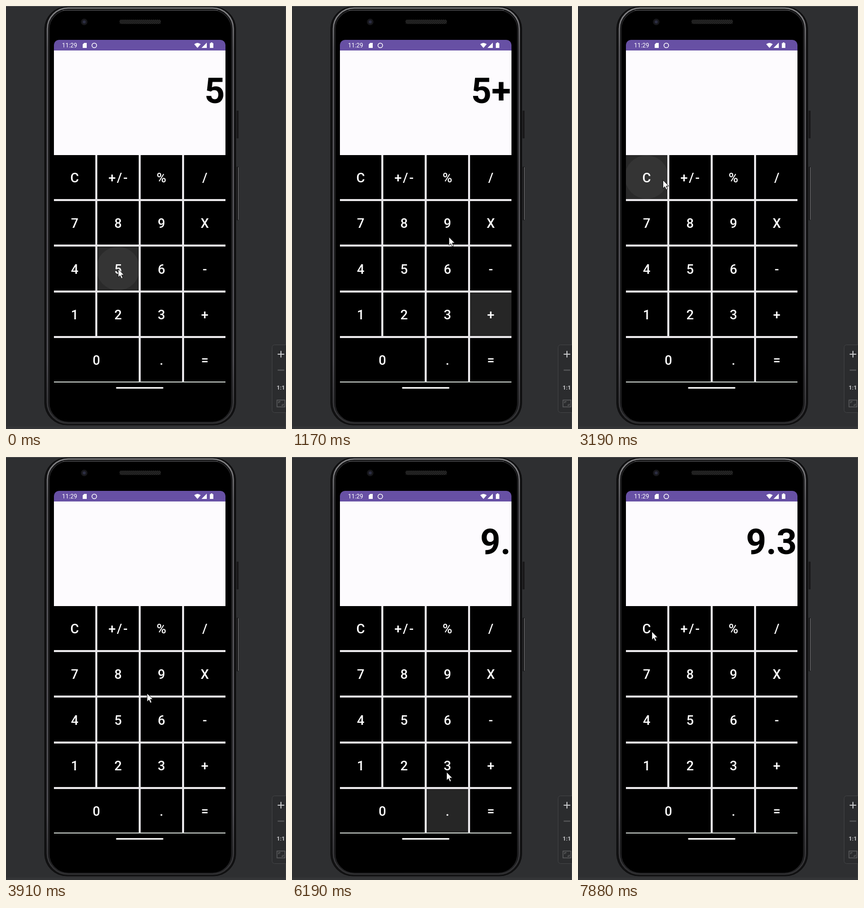
An HTML page that plays this animation: 555x837 px, repeating every 8000 ms.

```html
<!DOCTYPE html>
<html lang="en">
<head>
<meta charset="utf-8">
<title>Calculator</title>
<style>
html, body { margin: 0; width: 100%; height: 100%; overflow: hidden; background: #2e2f31; }
svg { display: block; }
text { font-family: Roboto, sans-serif; }
.label { font-size: 26px; font-weight: 500; letter-spacing: 2.3px; fill: #fff; text-anchor: middle; }
</style>
</head>
<body>
<svg width="555" height="837" viewBox="0 0 555 837">
  <defs>
    <linearGradient id="rim" x1="0" y1="0" x2="0" y2="1">
      <stop offset="0" stop-color="#858587"/>
      <stop offset=".1" stop-color="#605f64"/>
      <stop offset=".85" stop-color="#55545a"/>
      <stop offset="1" stop-color="#303032"/>
    </linearGradient>
    <pattern id="mesh" width="4" height="4" patternUnits="userSpaceOnUse">
      <rect width="4" height="4" fill="#131313"/>
      <path d="M0 4L4 0M0 0L4 4" stroke="#353535" stroke-width=".8"/>
    </pattern>
  </defs>

  <rect width="555" height="837" fill="#2e2f31"/>
  <rect width="555" height="1" fill="#58595b"/>
  <rect y="832" width="555" height="5" fill="#343537"/>
  <rect x="554" width="1" height="837" fill="#444547"/>

  <!-- phone body -->
  <rect x="457" y="207" width="4" height="55" rx="1" fill="#19191a"/>
  <rect x="457" y="318" width="4" height="106" rx="1" fill="#19191a"/>
  <path d="M460.5 319V423" stroke="#757577"/>
  <rect x="76.5" y="1.5" width="379" height="827.5" rx="44" fill="#111112" stroke="#0b0b0c"/>
  <rect x="82" y="4" width="368.5" height="821.5" rx="41" fill="none" stroke="url(#rim)" stroke-width="2.6"/>
  <rect x="85.5" y="8" width="361.5" height="815.5" rx="38" fill="#000" stroke="#252527" stroke-width="1.6"/>
  <path d="M112 8.5H420" stroke="#5b5b5d"/>
  <circle cx="155" cy="31.5" r="6.5" fill="#17171b"/>
  <circle cx="155" cy="31.5" r="3" fill="#2c2e42"/>
  <rect x="225" y="27" width="82" height="8.5" rx="4" fill="url(#mesh)"/>

  <!-- screen -->
  <path d="M95 88V77A10 10 0 0 1 105 67H425A10 10 0 0 1 435 77V88Z" fill="#6750a4"/>
  <text x="111" y="82" font-size="12" fill="#fff">11:29</text>
  <g fill="#fff">
    <path d="M155 73H160V83H152V76Z"/>
    <path d="M373 75.5Q379.5 70.5 386 75.5L379.5 83Z"/>
    <path d="M398 72.5V83H387.5Z"/>
    <path d="M404 73.5H406V72H409V73.5H411V83H404Z"/>
  </g>
  <circle cx="175" cy="78" r="4.6" fill="none" stroke="#fff" stroke-width="1.5"/>
  <rect x="95" y="88" width="340" height="207" fill="#fdfbfe"/>
  <text id="display" x="433.6" y="192.4" font-size="70" font-weight="700" text-anchor="end"></text>

  <!-- keypad -->
  <rect x="95" y="295" width="340" height="449" fill="#e9e7ea"/>
  <rect x="95" y="743" width="340" height="2" fill="#cbd2cd"/>
  <g id="keys"></g>
  <svg id="glow" overflow="hidden">
    <rect id="tint" width="100%" height="100%"/>
    <circle id="ripple" cx="50%" cy="50%" fill="#343434"/>
  </svg>
  <g id="labels"></g>
  <rect x="218" y="754" width="94" height="3.2" rx="1.6" fill="#f0f0f0"/>

  <!-- zoom panel -->
  <rect x="527.5" y="670.5" width="40" height="134" rx="5" fill="#2b2c2e" stroke="#434446"/>
  <path d="M538.5 689H551.5M545 682.5V695.5" stroke="#c4c5c7" stroke-width="2"/>
  <path d="M538.5 720.5H551.5" stroke="#5b5c5e" stroke-width="2"/>
  <text x="536.5" y="758.5" font-size="11.5" font-weight="700" fill="#c4c5c7">1:1</text>
  <g fill="none" stroke="#5b5c5e" stroke-width="1.5">
    <rect x="537.2" y="779.7" width="15.6" height="13.6"/>
    <path d="M540.5 786V783H544M549.5 787V790H546"/>
  </g>

  <path id="cursor" d="M.4 .4V17L4.1 13.4L6.8 19.4L9.5 18.2L6.9 12.2H11.9Z" fill="#fff" stroke="#000" stroke-width=".9"/>
</svg>
<script>
const LOOP = 8000, STEP = 131.5;
const el = id => document.getElementById(id);
const set = (node, attrs) => {
  for (const k in attrs) node.setAttribute(k, attrs[k]);
  return node;
};
const add = (parent, tag, attrs) =>
  parent.appendChild(set(document.createElementNS("http://www.w3.org/2000/svg", tag), attrs));

// Keypad, with edges snapped to whole pixels
const keys = {};
["C +/- % /", "7 8 9 X", "4 5 6 -", "1 2 3 +", "0 0 . ="].forEach((line, row) => {
  line.split(" ").forEach((name, col) => {
    if (name === "0" && col) return;
    const top = 295.4 + 90.4 * row, x = 95 + 86 * col, y = Math.round(top);
    const width = name === "0" ? 168 : 82, height = Math.round(top + 86.4) - y;
    keys[name] = { x, y, width, height };
    add(el("keys"), "rect", keys[name]);
    add(el("labels"), "text", { class: "label", x: x + width / 2 + 1.2, y: Math.floor(top + 53.9) })
      .textContent = name;
  });
});

// Key, touch time, fade time
const presses = [
  ["5", -120, 360], ["+", 780, 1320], ["9", 1840, 2350], ["C", 3070, 3790],
  ["9", 4630, 5410], [".", 5680, 6330], ["3", 6990, 7520]
];
const DELAY = 120, FADE = 120, SETTLE = 150;

// Pointer: leave time, arrival time, x, y
const start = [222, 520];
const moves = [
  [0, 480, 379, 603],
  [780, 1170, 311, 458],
  [1170, 1440, 305, 433],
  [2240, 2470, 168, 344],
  [3680, 3910, 277, 468],
  [3910, 4330, 304, 459],
  [4750, 4860, 284, 652],
  [4870, 5140, 298, 719],
  [5800, 6180, 306, 623],
  [6190, 6450, 306, 606],
  [7120, 7380, 217, 307],
  [7380, 7880, 146, 345]
];

const clamp = v => Math.min(1, Math.max(0, v));

function pointerAt(t) {
  let [x, y] = start;
  for (const [leave, arrive, toX, toY] of moves) {
    const done = clamp((t - leave) / (arrive - leave));
    x += (toX - x) * done;
    y += (toY - y) * done;
  }
  return [x, y];
}

function reading(t) {
  return presses.filter(p => p[1] + DELAY <= t)
    .reduce((shown, [name]) => name === "C" ? "" : shown + name, "");
}

function drawGlow(t) {
  const press = presses.find(p => t >= p[1] && t < p[2] + FADE);
  set(el("glow"), { visibility: press ? "visible" : "hidden" });
  if (!press) return;
  const [name, touch, fade] = press;
  const settled = t >= fade - SETTLE;
  set(el("glow"), keys[name]);
  set(el("tint"), { fill: t >= fade ? "#121212" : settled ? "#262626" : "#2a2a2a" });
  set(el("ripple"), { r: settled ? 0 : 28 + 15 * clamp((t - touch) / DELAY) });
}

function draw(t) {
  const stepped = Math.floor((t + 50) / STEP) * STEP;
  el("display").textContent = reading(t);
  drawGlow(t);
  set(el("cursor"), { transform: `translate(${pointerAt(stepped)})` });
}

const begin = performance.now();
function tick() {
  draw((performance.now() - begin) % LOOP);
  requestAnimationFrame(tick);
}
tick();
</script>
</body>
</html>
```
